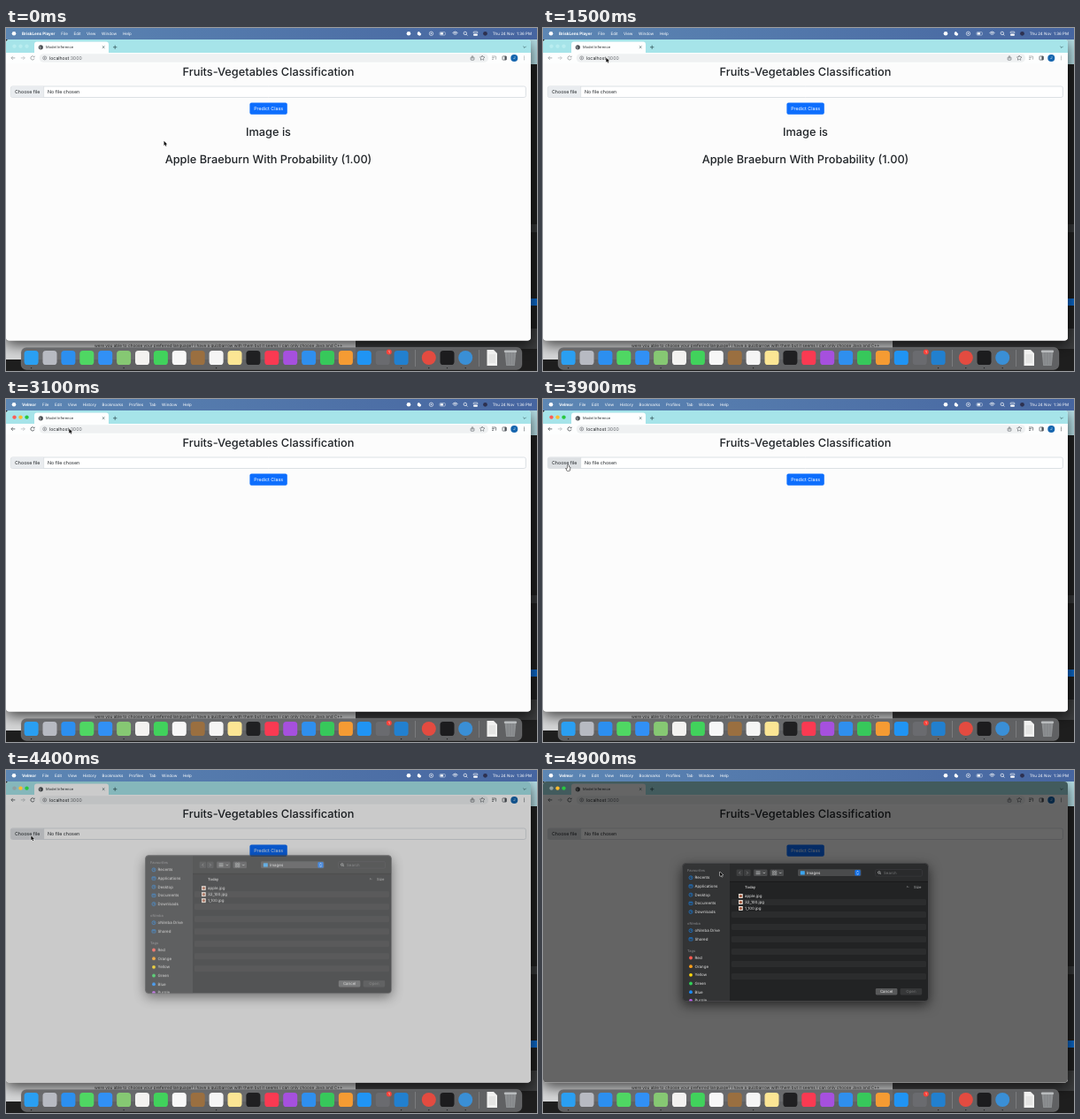
These frames come from a looping animation (600x388 px, 5 s). An HTML page with a canvas:

```html
<!DOCTYPE html>
<html lang="en">
<head>
<meta charset="utf-8">
<title>Model Inference</title>
<style>
html, body { margin: 0; width: 100%; height: 100%; overflow: hidden; background: #1e1e1e; }
canvas { display: block; width: 600px; height: 388px; }
</style>
</head>
<body>
<canvas id="stage"></canvas>
<script>
const W = 600, H = 388, LOOP = 5000, STEP = 100;
const ACTIVE = 1900, FOCUS = 2100, RELOAD = 2700, HOVER = 3700, OPEN = 4300;
const ratio = window.devicePixelRatio || 1;
const FONT = 'Inter, "Open Sans", sans-serif';

function setup(canvas) {
  canvas.width = W * ratio;
  canvas.height = H * ratio;
  const c = canvas.getContext('2d');
  c.scale(ratio, ratio);
  c.textRendering = 'geometricPrecision';
  return c;
}

const stage = setup(document.getElementById('stage'));
const sheetCanvas = document.createElement('canvas');
const sheet = setup(sheetCanvas);
let g = stage;

function paint(fill, stroke, line) {
  if (fill) { g.fillStyle = fill; g.fill(); }
  if (stroke) { g.strokeStyle = stroke; g.lineWidth = line; g.stroke(); }
}

function box(x, y, w, h, fill, r = 0, stroke, line = 0.6) {
  g.beginPath();
  g.roundRect(x, y, w, h, r);
  paint(fill, stroke, line);
}

function dot(x, y, r, fill, stroke, line = 0.6) {
  arc(x, y, r, 0, Math.PI * 2, fill, stroke, line);
}

function arc(x, y, r, from, to, fill, stroke, line) {
  g.beginPath();
  g.arc(x, y, r, from, to);
  paint(fill, stroke, line);
}

function line(color, width, ...points) {
  g.beginPath();
  for (let i = 0; i < points.length; i += 2) g.lineTo(points[i], points[i + 1]);
  paint(null, color, width);
}

function poly(points, fill, stroke, width) {
  g.beginPath();
  for (let i = 0; i < points.length; i += 2) g.lineTo(points[i], points[i + 1]);
  g.closePath();
  paint(null, stroke, width);
  paint(fill);
}

// A small open arrowhead; dx and dy give the direction of its tip.
function chevron(x, y, dx, dy, size, color) {
  line(color, 0.7, x - dx * size - dy * size, y - dy * size - dx * size, x, y,
    x - dx * size + dy * size, y - dy * size + dx * size);
}

// Text is centred vertically on y; the result is its width.
function label(str, x, y, size, color, weight = 400, align = 'left') {
  g.font = `${weight} ${size}px ${FONT}`;
  g.textAlign = align;
  g.fillStyle = color;
  g.fillText(str, x, y + size * 0.36);
  return g.measureText(str).width;
}

// With a shadow, canvas blur is in device pixels.
function shadowed(blur, dy, color, draw) {
  g.save();
  g.shadowColor = color;
  g.shadowBlur = blur * ratio;
  g.shadowOffsetY = dy * ratio;
  draw();
  g.restore();
}

const clamp = (v) => Math.max(0, Math.min(1, v));
const lerp = (a, b, k) => a + (b - a) * k;
const easeOut = (k) => 1 - (1 - k) ** 3;

// Pointer stops: arrival time, departure time, x, y.
const STOPS = [
  [0, 0, 178.5, 127.8], [200, 300, 322, 118], [900, 900, 110, 81],
  [1400, 3300, 71.3, 33.6], [3800, 4500, 28.3, 74.2], [4900, 5000, 200, 115]
];

function pointerAt(t) {
  const next = Math.max(1, STOPS.findIndex((s) => t <= s[1]));
  const a = STOPS[next - 1], b = STOPS[next];
  const k = clamp((t - a[1]) / (b[0] - a[1]));
  return [lerp(a[2], b[2], k), lerp(a[3], b[3], k)];
}

function desktop() {
  box(0, 0, W, H, '#1e1e1e');
  box(590, 13, 10, 28, '#b4dce3');
  box(590, 222, 10, 9, '#333435');
  box(590, 306, 10, 8, '#0b65c4');
  box(-5, 340, 400, 35, '#d6d7d8', 4);
  box(395, 340, 205, 23, '#3a3b3c');
}

function backText() {
  const w = label('were you able to choose your preferred language? I have a quizbarrow with them but it seems I can only choose Java and C++',
    100, 359.6, 4.7, '#1d1d1d');
  line('#333', 0.4, 100, 362, 100 + w, 362);
}

function menuBar(active) {
  const blue = g.createLinearGradient(0, 0, W, 0);
  blue.addColorStop(0, '#5d87b4');
  blue.addColorStop(1, '#4665a0');
  box(0, 0, W, 13, blue);
  const y = 6.3, white = '#fff';
  dot(9, y, 2.3, white);
  let x = 18 + 7 + label(active ? 'Velmor' : 'BriskLens Player', 18, y, 4.6, white, 700);
  const names = active ? 'File Edit View History Bookmarks Profiles Tab Window Help' : 'File Edit View Window Help';
  for (const name of names.split(' ')) x += 6.6 + label(name, x, y, 4.5, white);

  dot(455, y, 2.3, white);
  arc(467, y, 2.3, 0.2, 4.6, white);
  dot(480.5, y, 2.2, null, white);
  dot(480.5, y, 0.8, white);
  box(490, 4.6, 6.4, 3.5, null, 1, '#dfe6f0', 0.5);
  box(490.7, 5.3, 3.4, 2.1, white, 0.4);
  for (let r = 1.4; r < 5; r += 1.4) arc(507.5, 8.5, r, -2.35, -0.8, null, white, 0.8);
  dot(518.8, 5.9, 1.7, null, white, 0.7);
  line(white, 0.7, 520, 7.1, 521.4, 8.5);
  box(528, 4.1, 5, 1.9, null, 1, white);
  box(528, 6.8, 5, 1.9, white, 1);
  dot(541.5, y, 2.4, '#2d3150');
  label('Thu 24 Nov  1:36 PM', 594, y, 4.5, white, 400, 'right');
}

function tabStrip() {
  const ink = '#2f4f53';
  box(0, 13, 593, 30, '#a6e4e9', [4, 4, 0, 0]);
  box(32, 15.5, 84, 14, '#fdfefe', [3, 3, 0, 0]);
  dot(39.3, 21.8, 2.6, '#4b4f53');
  line('#fff', 0.5, 37.2, 20.8, 39, 21.6, 38.6, 23.8);
  label('Model Inference', 45, 21.7, 4.05, '#2c2f31');
  for (const s of [-1.3, 1.3]) line(ink, 0.6, 110.2 - 1.3, 21.6 - s, 110.2 + 1.3, 21.6 + s);
  line(ink, 0.7, 121, 21.7, 125.4, 21.7);
  line(ink, 0.7, 123.2, 19.5, 123.2, 23.9);
  chevron(586, 22.4, 0, 1, 1.6, ink);
}

function windowButtons(active, open) {
  const off = '#b9edf0';
  [open ? '#8f9ea0' : '#fb5f57', '#fdbc2e', '#28c840']
    .forEach((c, i) => dot(9.5 + i * 7, 20.6, 2.2, active ? c : off));
}

function toolbar(active, focused) {
  const ink = active ? '#4a4e52' : '#93979a';
  const dark = '#50545a', pale = '#b6babd', y = 33.9;
  box(0, 28, 593, 13, '#fdfefe');
  line(ink, 0.8, 6, y, 10.3, y);
  chevron(5.8, y, -1, 0, 2, ink);
  line(pale, 0.8, 16.8, y, 21.3, y);
  chevron(21.3, y, 1, 0, 2, pale);
  arc(30, y, 2.1, 0.3, 5.5, null, ink, 0.8);
  poly([30.6, 33.2, 32.4, 33.2, 32.4, 31.3], ink);
  const fill = focused ? '#fff' : '#eff1f2';
  box(37.7, 29.2, 507.3, 9.6, fill, 4.8, focused ? '#2f74da' : null, 1.1);
  dot(43.7, y, 2, null, dark, 0.5);
  line(dark, 0.6, 43.7, 32.7, 43.7, 35.1);
  const w = label('localhost', 49, y, 5.2, '#26292c');
  label(':3000', 49 + w, y, 5.2, '#676b70');

  box(525.2, 33, 3.7, 3.2, null, 0.5, dark);
  line(dark, 0.6, 527, 34.8, 527, 31);
  const star = [];
  for (let i = 0; i < 10; i++) {
    const r = i % 2 ? 1.2 : 2.6, a = i * Math.PI / 5 - Math.PI / 2;
    star.push(538.2 + r * Math.cos(a), 34 + r * Math.sin(a));
  }
  poly(star, fill, dark, 1);
  for (let i = 0; i < 3; i++) {
    line(ink, 0.7, 549, 32 + i * 1.7, 553 - i, 32 + i * 1.7);
    dot(585.6, 32 + i * 1.9, 0.55, ink);
  }
  line(ink, 0.7, 553.6, 31.8, 553.6, 35.6);
  box(561, 31.9, 4.4, 4.2, null, 0.6, dark, 0.7);
  box(563.4, 31.9, 2, 4.2, dark);
  dot(574.3, 34, 4, '#1565ae');
  label('J', 574.3, 34, 4, '#fff', 400, 'center');
}

function page(t) {
  box(0, 40, 593, 313.5, '#fcfcfc', [0, 0, 4, 4]);
  const head = (s, y) => label(s, 296.5, y, 12.78, '#212529', 500, 'center');
  head('Fruits-Vegetables Classification', 49.5);
  if (t < RELOAD) {
    head('Image is', 117.7);
    head('Apple Braeburn With Probability (1.00)', 148.3);
  }
  box(5.4, 66, 582, 12.5, '#fff', 2, '#ced4da', 0.7);
  box(5.7, 66.3, 37, 11.9, t >= HOVER ? '#dde0e3' : '#e9ecef', [2, 0, 0, 2]);
  line('#ced4da', 0.5, 42.7, 66, 42.7, 78.5);
  label('Choose file', 10, 72.2, 5.3, '#212529');
  label('No file chosen', 47, 72.2, 5.3, '#212529');
  box(275.4, 84.5, 42.4, 13.2, '#0d6efd', 2);
  label('Predict Class', 296.6, 91.2, 5.3, '#fff', 400, 'center');
}

const DOCK = ['#2a9ff2', '#b7bac2', '#2c8ff0', '#4fd763', '#3190f5', '#86c873', '#f3f2f0', '#41d25c',
  '#f7f7f7', '#9a6f40', '#f5f5f5', '#fbe594', '#202022', '#fa3a52', '#a650de', '#2f8fee', '#37c85b',
  '#f59b33', '#2094f4', '#6a6b6f', '#2280cf'];
const RUNNING = [0, 5, 10, 20];

function dock() {
  const y = 373;
  const app = (x, color, round) => box(x - 8, y - 8, 16, 16, color, round ? 8 : 3.6);
  const light = (x) => dot(x, 384.6, 0.7, '#1a1a1a');
  box(17, 361.3, 566, 25.2, 'rgba(100,101,104,0.94)', 6, 'rgba(170,170,170,0.4)', 0.5);
  DOCK.forEach((c, i) => {
    const x = 28.6 + i * 20.9;
    app(x, c);
    if (RUNNING.includes(i)) light(x);
  });
  ['#e34b40', '#1c1c1e', '#3a8fd6'].forEach((c, i) => {
    const x = 477.8 + i * 20.7;
    app(x, c, i !== 1);
    light(x);
  });
  for (const x of [462.5, 534.5]) line('#97989a', 0.5, x, 364, x, 383);
  dot(432.8, 366.6, 3, '#f5433a');
  label('1', 432.8, 366.6, 4, '#fff', 400, 'center');

  poly([543.5, 364, 551, 364, 555, 368, 555, 382, 543.5, 382], '#f1f1f0');
  for (let row = 370; row < 380; row += 2) line('#bdbebf', 0.5, 545.5, row, 553, row);
  poly([563.5, 366, 576.5, 366, 574.8, 382, 565.2, 382], '#8d9092');
  for (let x = 567; x < 575; x += 3) line('#74777a', 0.5, x, 367, x, 381);
  box(562.8, 364.4, 14.4, 2.6, '#b9bcbe', 1.3);
}

const BLUE = '#1689f5';
const SECTIONS = [
  ['Favourites', 'Recents', 'Applications', 'Desktop', 'Documents', 'Downloads'],
  ['oNimba', 'oNimba Drive', 'Shared'],
  ['Tags', 'Red', 'Orange', 'Yellow', 'Green', 'Blue', 'Purple']
];
const TAG_COLORS = ['#ff5b50', '#ff9f1a', '#ffd60a', '#32d158', '#1a8cff', '#c05df0'];

function sidebar() {
  box(157, 105, 54, 157, '#333435');
  let y = 114;
  for (const [title, ...rows] of SECTIONS) {
    label(title, 163, y, 4, '#7d7e80', 500);
    rows.forEach((name, i) => {
      const row = y + 7.8 + i * 9.67;
      if (title === 'Tags') {
        dot(167, row, 1.9, TAG_COLORS[i]);
      } else if (i % 2) {
        box(165, row - 1.7, 4, 3.4, null, 0.5, BLUE);
        line(BLUE, 0.7, 165.4, row - 0.6, 168.6, row - 0.6);
      } else {
        dot(167, row, 2, null, BLUE);
        line(BLUE, 0.6, 167, row - 1.2, 167, row, 168, row);
      }
      label(name, 171.5, row, 4.45, '#e4e4e4');
    });
    y += 11.5 + rows.length * 9.67;
  }
}

function sheetToolbar() {
  const field = '#4a4b4c', ink = '#cfd0d1', y = 116.3;
  box(211, 105, 224.5, 21, '#2a2b2c');
  for (const [x, d] of [[218.6, -1], [227, 1]]) {
    box(x, 112.6, 7.6, 7.4, '#3d3e3f', 1.2);
    chevron(x + 3.8 + d * 0.7, y, d, 0, 1.5, '#8a8b8c');
  }
  for (const x of [238, 256.5]) {
    box(x, 112.6, 15.5, 7.4, field, 1.2);
    chevron(x + 11.8, 117, 0, 1, 1.2, ink);
  }
  for (let i = -1; i < 2; i++) line(ink, 0.6, 240.5, y + i * 1.5, 245.5, y + i * 1.5);
  for (let i = 0; i < 4; i++) box(259.3 + (i % 2) * 2.7, 114.1 + (i >> 1) * 2.6, 1.9, 1.9, null, 0.3, ink, 0.5);
  box(288, 112.3, 71.5, 7.8, field, 1.4);
  box(290.8, 114.2, 5, 4.2, '#3ba4ee', 0.5);
  label('Images', 298, y, 4.45, '#ececec');
  box(352.4, 113, 6.2, 6.4, '#1470e6', 1.2);
  for (const d of [-1, 1]) chevron(355.5, y + d * 1.9, 0, d, 1.1, '#fff');
  box(375.5, 112.5, 53, 7.6, '#2a2b2c', 1.4, '#454647', 0.4);
  dot(379.8, 115.9, 1.3, null, ink);
  line(ink, 0.6, 380.7, 116.8, 381.9, 118);
  label('Search', 385, y, 4.4, '#77787a');
}

function fileList() {
  line('#111', 0.6, 211, 126.3, 435, 126.3);
  label('Today', 228, 132.2, 4.2, '#e0e0e0', 500);
  chevron(412, 131.6, 0, -1, 1.1, '#a0a1a2');
  label('Size', 419, 132.2, 4.2, '#9d9e9f', 500);
  for (let y = 146; y < 240; y += 14) box(213, y, 220, 7, '#2b2c2d', 1.5);
  ['apple.jpg', '32_100.jpg', '1_100.jpg'].forEach((name, i) => {
    const y = 142.5 + i * 7;
    box(221, y - 2.4, 4.8, 4.8, '#e6dcd3', 0.4);
    dot(223.4, y, 1.6, '#a4583c');
    label(name, 228, y, 4.45, '#e8e8e8');
  });
  const button = (name, x, fill, ink) => {
    box(x, 247, 24.6, 7.4, fill, 1.4);
    label(name, x + 12.3, 250.7, 4.4, ink, 400, 'center');
  };
  button('Cancel', 375.8, '#58595a', '#f0f0f0');
  button('Open', 403.6, '#363738', '#747576');
}

function drawSheet() {
  const frame = (fill, stroke) => box(157.5, 105.5, 278, 156, fill, 4, stroke, 0.5);
  g = sheet;
  shadowed(14, 4, 'rgba(0,0,0,0.65)', () => frame('#222324'));
  g.save();
  frame();
  g.clip();
  sidebar();
  sheetToolbar();
  fileList();
  g.restore();
  frame(null, '#5a5b5c');
  g = stage;
}

function pointer(x, y, hand) {
  g.save();
  g.translate(x, y);
  g.lineJoin = 'round';
  if (hand) {
    poly([-0.6, 0.8, 0.6, 0.8, 0.7, 2.8, 2.5, 3.4, 1.6, 6.8, -1, 6.8, -2.3, 4.4, -0.7, 4.4], '#fff', '#222', 1.1);
  } else {
    poly([0, 0, 0, 5.2, 1.2, 4.1, 2, 6, 2.9, 5.6, 2.1, 3.8, 3.7, 3.7], '#111', '#fff', 0.9);
  }
  g.restore();
}

function render(t) {
  const active = t >= ACTIVE, open = t >= OPEN;
  const drop = clamp((t - OPEN) / 300);
  const shown = easeOut(drop);
  const windowShape = (fill) => box(0, 13, 593, 340.5, fill, 4);

  desktop();
  shadowed(16, 5, 'rgba(0,0,0,0.7)', () => windowShape('#fcfcfc'));
  backText();
  menuBar(active);
  tabStrip();
  toolbar(active, t >= FOCUS && t < RELOAD);
  page(t);
  windowShape(`rgba(0,0,0,${0.6 * drop})`);
  windowButtons(active, open);

  g.globalAlpha = shown;
  g.drawImage(sheetCanvas, 0, -30 * (1 - shown), W, H);
  g.globalAlpha = 1;

  dock();
  pointer(...pointerAt(t), t >= HOVER && !open);
}

const start = performance.now();
let last = -1;
function tick() {
  const t = (performance.now() - start) % LOOP;
  const now = Math.floor(t / STEP) * STEP;
  if (now !== last) render(last = now);
  requestAnimationFrame(tick);
}

drawSheet();
tick();
</script>
</body>
</html>
```
